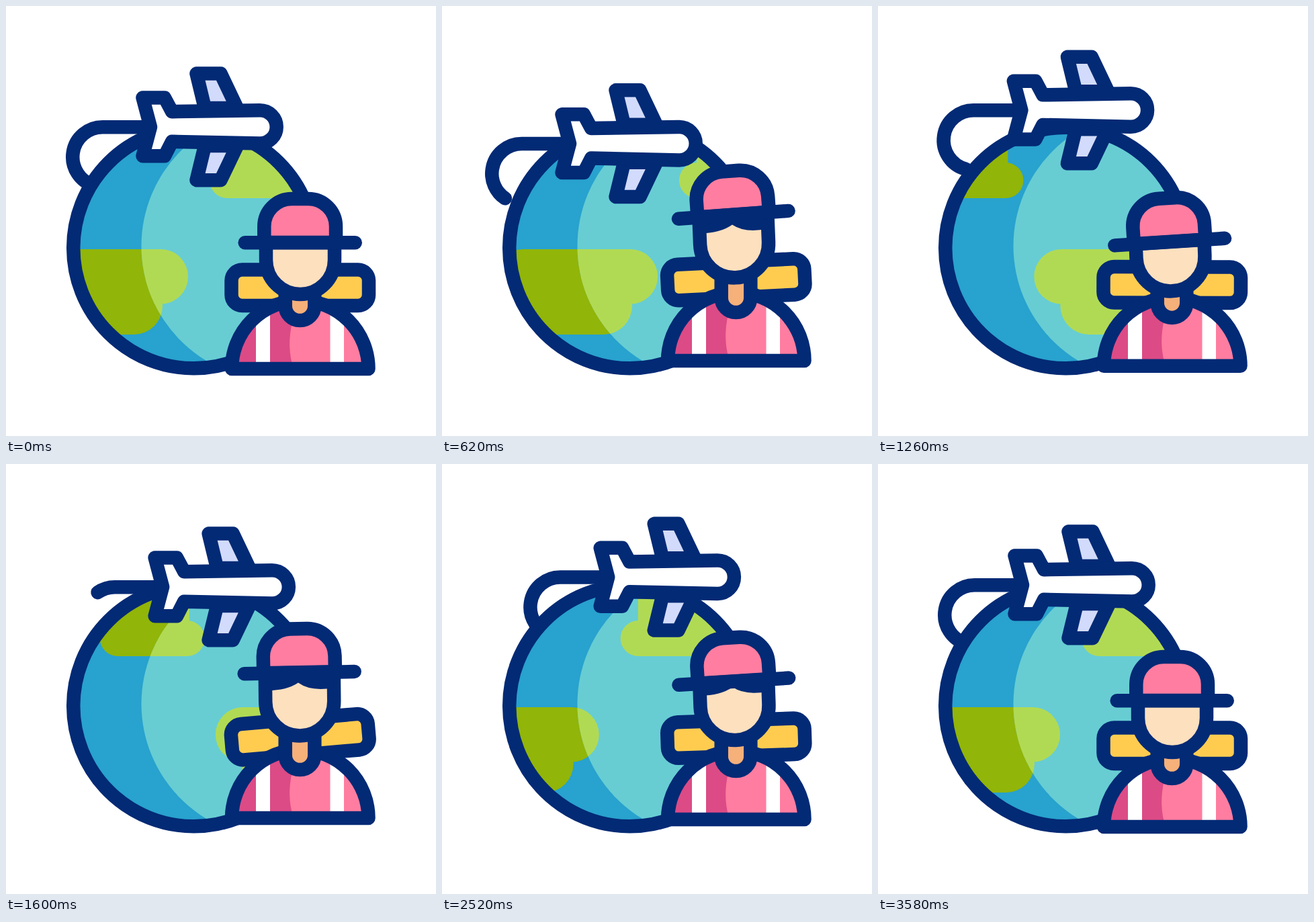
Write an HTML page that moves like this. It is 640 px wide and 640 px high and loops after 3600 ms.

```html
<!DOCTYPE html>
<html lang="en">
<head>
<meta charset="utf-8">
<title>Traveller</title>
<style>
  html, body { margin: 0; height: 100%; overflow: hidden; background: #fff; }
  svg { display: block; width: 100vw; height: 100vh; }
  .line { stroke: #032a75; stroke-width: 20.5; stroke-linejoin: round; stroke-linecap: round; }
</style>
</head>
<body>
<svg viewBox="0 0 640 640">
  <defs>
    <clipPath id="globeClip"><circle cx="279.5" cy="360" r="179"/></clipPath>
    <clipPath id="lightClip"><circle cx="401" cy="357" r="199.5"/></clipPath>
    <clipPath id="bodyClip"><path d="M336 540A101.7 101.7 0 0 1 539.5 540Z"/></clipPath>
    <g id="land">
      <rect x="30" y="362" width="241" height="81.5" rx="40.7"/>
      <rect x="69" y="403" width="164" height="86" rx="43"/>
      <rect x="303" y="233" width="156" height="53" rx="26.5"/>
      <rect x="329" y="150" width="107" height="110"/>
    </g>
    <g id="lands">
      <use href="#land"/>
      <use href="#land" x="-445"/>
    </g>
  </defs>

  <g id="trail">
    <path id="dash" class="line" fill="none" pathLength="100" stroke-dasharray="100 99"
      d="M132 267.6A44.5 44.5 0 0 1 145 180.2H207"/>
  </g>

  <g clip-path="url(#globeClip)">
    <rect x="90" y="170" width="380" height="380" fill="#28a2ce"/>
    <use class="lands" href="#lands" fill="#91b509"/>
    <g clip-path="url(#lightClip)">
      <rect x="90" y="170" width="380" height="380" fill="#67cdd3"/>
      <use class="lands" href="#lands" fill="#b1da54"/>
    </g>
  </g>
  <circle class="line" cx="279.5" cy="360" r="179.3" fill="none"/>

  <g id="plane" class="line">
    <path fill="#d2dbfb" d="M296 152L283.5 100.5H319.5L344 152ZM296 208L283.5 259.2H319.5L344 208Z"/>
    <path fill="#fff" d="M203.5 136.5H236L247 157.2L378 155.2A24.7 24.7 0 0 1 378 204.6L247 201.8L236 223.3H203.5L215 180Z"/>
  </g>

  <g id="body">
    <rect id="pack" class="line" x="335.5" y="392.5" width="204.5" height="53.5" rx="16" fill="#ffcc50"/>
    <g clip-path="url(#bodyClip)">
      <rect x="330" y="430" width="220" height="110" fill="#ff7da0"/>
      <path fill="#dc4b86" d="M330 430H440Q412 492 428 540H330Z"/>
      <path fill="#fff" d="M372 430H393V540H372ZM482.5 430H503V540H482.5Z"/>
    </g>
    <path class="line" fill="none" d="M336 540A101.7 101.7 0 0 1 539.5 540Z"/>
    <path class="line" fill="#f6b07a" d="M415.7 405V446.3A21.8 21.8 0 0 0 459.3 446.3V405Z"/>
  </g>

  <g id="head">
    <path class="line" fill="#fde0be" d="M387 337V378A51 51 0 0 0 489 378V337Z"/>
    <path fill="#032a75" d="M387 335H489V358Q455 364 436 350Q418 362 387 361Z"/>
  </g>

  <g id="hat" class="line">
    <path fill="#ff7da0" d="M384.3 352V328A41 41 0 0 1 425.3 287H450A41 41 0 0 1 491 328V352Z"/>
    <path d="M355.7 352.3H519.7"/>
  </g>
</svg>

<script>
const LOOP = 3600;
const byId = id => document.getElementById(id);
const place = (id, transform) => byId(id).setAttribute('transform', transform);
const smooth = u => u * u * (3 - 2 * u);

// Keys are [time, value] pairs, eased in and out between neighbours.
function track(keys, t) {
  if (t <= keys[0][0]) return keys[0][1];
  for (let i = 1; i < keys.length; i++) {
    const [t0, v0] = keys[i - 1], [t1, v1] = keys[i];
    if (t < t1) return v0 + (v1 - v0) * smooth((t - t0) / (t1 - t0));
  }
  return keys[keys.length - 1][1];
}

// Three equal hops, then rest.
function hop(t, height) {
  const half = 530;
  if (t <= 0 || t >= 6 * half) return 0;
  const phase = t / half % 2;
  return -height * smooth(phase < 1 ? phase : 2 - phase);
}

// cubic-bezier(.33, 0, .33, 1)
function spinEase(x) {
  let lo = 0, hi = 1;
  for (let i = 0; i < 24; i++) {
    const s = (lo + hi) / 2;
    if (.99 * s * (1 - s) + s ** 3 < x) lo = s; else hi = s;
  }
  return smooth(lo);
}

const planeX = [[0, 0], [600, -25], [2200, 38], [3500, 0]];
const planeY = [[0, 0], [600, 25], [1200, -26], [1800, 13], [2400, -13], [3000, 0]];
const trailCycles = [[535, 0], [1265, 1], [2260, 2]];
const hatY = [[0, 0], [580, -42], [1220, 0], [1620, -42], [2240, 0], [2690, -42], [3270, 0]];
const headTilt = [[150, 0], [850, -3.1], [1900, 0], [2200, 0], [2650, -2.5], [3200, 0]];
const packTilt = [[0, 0], [400, -5], [1050, 3], [1580, -5], [2150, 3], [2700, -3.5], [3250, 1.5], [3580, 0]];

function draw(t) {
  const flight = `translate(${track(planeX, t)} ${track(planeY, t)})`;
  place('plane', flight);
  place('trail', flight);
  byId('dash').setAttribute('stroke-dashoffset', -199 * (track(trailCycles, t) % 1));

  const spin = 445 * spinEase(t / LOOP);
  document.querySelectorAll('.lands').forEach(el => el.setAttribute('x', spin));

  const tilt = track(headTilt, t);
  const nod = `rotate(${tilt} 437.5 450)`;
  place('body', `translate(0 ${hop(t, 13)})`);
  place('pack', `rotate(${track(packTilt, t)} 437.5 419)`);
  place('head', `translate(0 ${hop(t - 55, 25)}) ${nod}`);
  place('hat', `translate(0 ${track(hatY, t)}) ${nod} rotate(${.8 * tilt} 437.5 352)`);
}

function frame() {
  draw(performance.now() % LOOP);
  requestAnimationFrame(frame);
}
frame();
</script>
</body>
</html>
```
